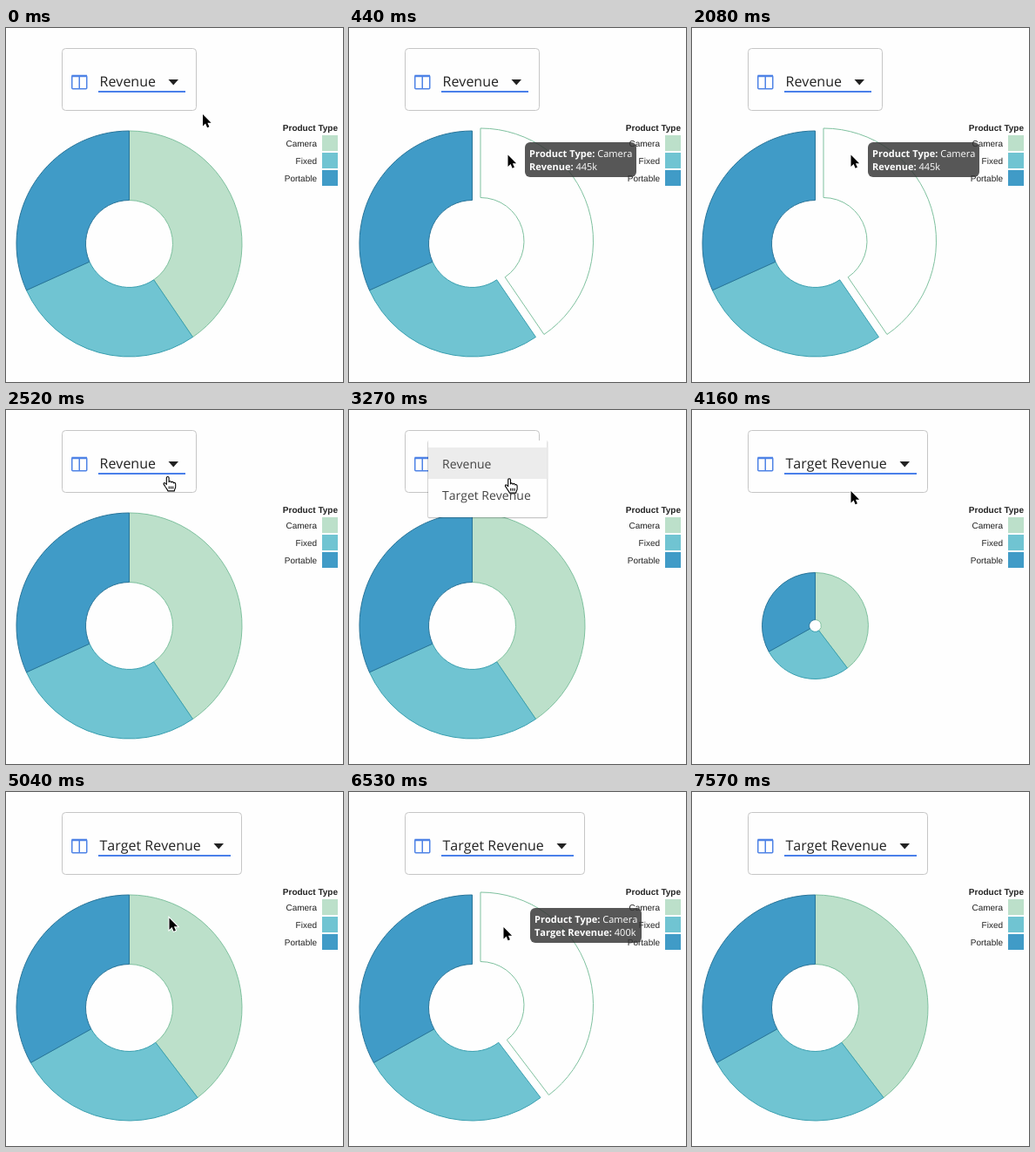
Write an HTML page that moves like this. It is 387 px wide and 406 px high and loops after 7670 ms.

```html
<!DOCTYPE html>
<html lang="en">
<head>
<meta charset="utf-8">
<title>Revenue donut</title>
<style>
html, body { margin: 0; width: 100%; height: 100%; overflow: hidden; background: #fefefe; }
svg { display: block; width: 100vw; height: 100vh; }
text { font-family: "Open Sans", sans-serif; font-kerning: none; text-rendering: geometricPrecision; white-space: pre; }
.legend text { font: 10px "Liberation Sans", Arial, sans-serif; text-anchor: end; fill: #222; }
.legend .title { font-weight: bold; font-kerning: normal; }
.label { font-size: 16px; }
.menu text { font-size: 14px; fill: #444; }
.tip text { font-size: 11px; fill: #fff; }
.tip .key { font-weight: bold; }
</style>
</head>
<body>
<svg viewBox="0 0 387 406">
  <g id="pie"></g>

  <g class="legend" id="legend">
    <text class="title" x="381" y="118">Product Type</text>
  </g>

  <rect id="box" x="64.5" y="23.5" height="71" rx="4" fill="#fefefe" stroke="#c6c6c6"/>
  <g fill="none" stroke="#4f83e6">
    <rect x="75.75" y="54.75" width="17" height="15" rx="1" stroke-width="1.5"/>
    <path d="M75.5 55H93" stroke-width="2.5"/>
    <path d="M84.25 55V70" stroke-width="1.5"/>
  </g>
  <g id="choice" fill="#222">
    <text class="label" id="label" x="107.5" y="67"></text>
    <path id="caret" d="M0 59H11.5L5.75 65.5Z"/>
  </g>
  <rect id="line" x="106"/>

  <g class="menu" id="menu">
    <rect x="90.5" y="36" width="137.5" height="88.5" rx="2" opacity=".1"/>
    <rect x="90" y="35" width="138.5" height="89" rx="2" opacity=".13"/>
    <rect x="91" y="35" width="136.5" height="88" rx="1" fill="#fefefe"/>
    <rect id="row" x="91" width="136.5" height="36" fill="#ececec"/>
    <text x="107" y="67">Revenue</text>
    <text x="107" y="103">Target Revenue</text>
  </g>

  <g class="tip" id="tip">
    <rect width="128" height="40" rx="6" fill="#323232" fill-opacity=".82"/>
    <text x="5" y="17"><tspan class="key">Product Type:</tspan> Camera</text>
    <text x="5" y="32"><tspan class="key" id="tipKey"></tspan><tspan id="tipVal"></tspan></text>
  </g>

  <path id="arrow" d="M0 0V13.4L3.1 10.6L5.1 15.2L7.4 14.2L5.4 9.8H9.6Z"
        fill="#000" stroke="#fff" stroke-width="2" paint-order="stroke"/>
  <path id="hand" fill="#fff" stroke="#000" stroke-width="1.1" stroke-linejoin="round"
        d="M-2 9V1.4C-2 -.4 .8 -.4 .8 1.4V6.2C1.2 4.8 3.4 5 3.5 6.6C4.2 5.4 6 5.8 6.1 7.3C7 6.5 8.4 7 8.4 8.6V11.5C8.4 13.5 7.2 14 7 16.5H-.4C-.6 14.6 -2.6 13.2 -3.6 11.2C-4.4 9.6 -6 8.6 -5.2 7.6C-4.2 6.6 -3 7.8 -2 9ZM1 11V14M3.2 11V14M5.4 11V14"/>
</svg>
<script>
const LOOP = 7670, STEP = 148.5;
const CX = 141.5, CY = 247.5, INNER = 50, OUTER = 129.5;
const $ = id => document.getElementById(id);
const set = (el, attrs) => { for (const k in attrs) el.setAttribute(k, attrs[k]); };
const show = (el, on) => set(el, { visibility: on ? "visible" : "hidden" });
const make = (tag, parent, attrs) => {
  const el = document.createElementNS("http://www.w3.org/2000/svg", tag);
  set(el, attrs);
  return parent.appendChild(el);
};

const kinds = [
  { name: "Camera", fill: "#bce0ca", edge: "#7fc19f" },
  { name: "Fixed", fill: "#70c4d2", edge: "#3ba0b0" },
  { name: "Portable", fill: "#409bc7", edge: "#2a7599" }
];
// cuts: ends of the first two slices in degrees, clockwise from the top
const measures = [
  { name: "Revenue", value: "445k", cuts: [145.7, 245.7], right: 218.5, tip: [202, 131] },
  { name: "Target Revenue", value: "400k", cuts: [142.7, 240.9], right: 270.5, tip: [208, 133] }
];

kinds.forEach((k, i) => {
  k.path = make("path", $("pie"), { fill: k.fill, stroke: k.edge });
  make("text", $("legend"), { x: 357, y: 135.5 + 20 * i }).textContent = k.name;
  make("rect", $("legend"), { x: 363, y: 123 + 20 * i, width: 18, height: 18, fill: k.fill });
});

const between = (t, a, b) => t >= a && t < b;
const ramp = (t, a, b) => Math.min(1, Math.max(0, (t - a) / (b - a)));
const ease = x => x < .5 ? 4 * x ** 3 : 1 - (2 - 2 * x) ** 3 / 2;
const smooth = x => x * x * (3 - 2 * x);

// the pointer glides to each place in turn
const glides = [
  { from: 0, to: 440, x: 182.5, y: 145.5 },
  { from: 2080, to: 2670, x: 187, y: 64 },
  { from: 2970, to: 3560, x: 182.5, y: 93 },
  { from: 4455, to: 5040, x: 187.5, y: 144.5 },
  { from: 6385, to: 6530, x: 177.5, y: 155 },
  { from: 6535, to: 7400, x: 349, y: 396 }
];
function pointer(t) {
  let x = 226, y = 99;
  for (const g of glides) {
    const p = smooth(ramp(t, g.from, g.to));
    x += (g.x - x) * p;
    y += (g.y - y) * p;
  }
  return `translate(${x} ${y})`;
}

function arc(a0, a1, r0, r1) {
  const pt = (a, r) => {
    const q = a * Math.PI / 180;
    return (CX + r * Math.sin(q)).toFixed(2) + " " + (CY - r * Math.cos(q)).toFixed(2);
  };
  return `M${pt(a0, r1)}A${r1} ${r1} 0 0 1 ${pt(a1, r1)}L${pt(a1, r0)}` +
    `A${r0} ${r0} 0 0 0 ${pt(a0, r0)}Z`;
}

function drawPie(t, cuts) {
  const grow = t < 3850 ? 1 : ease(ramp(t, 3865, 4765));
  const r0 = INNER * grow, r1 = INNER + (OUTER - INNER) * grow;
  const ends = [0, ...cuts, 360];
  kinds.forEach((k, i) => set(k.path, { d: arc(ends[i], ends[i + 1], r0, r1) }));

  const out = ramp(t, 100, 310) - ramp(t, 2080, 2240) + ramp(t, 5050, 5200) - ramp(t, 6540, 6700);
  set(kinds[0].path, { transform: `translate(${9.5 * out} ${-3 * out})`, "fill-opacity": 1 - out });
}

function drawSelect(t, { name, right }) {
  const focus = !between(t, 3700, 4000);
  set($("box"), { width: right - 64.5 });
  set($("caret"), { transform: `translate(${right - 32} 0)` });
  set($("choice"), { opacity: focus ? 1 : .85 });
  set($("line"), {
    width: right - 118.5, y: focus ? 72 : 73,
    height: focus ? 2 : 1, fill: focus ? "#4a80ea" : "#d4d4d4"
  });
  $("label").textContent = name;

  set($("menu"), { opacity: ramp(t, 2820, 3110) - ramp(t, 3565, 3890) });
  set($("row"), { y: t >= 3400 ? 79 : 43 });
}

function drawTip(t, { name, value, tip }) {
  show($("tip"), between(t, 285, 2220) || between(t, 5185, 6670));
  set($("tip"), { transform: `translate(${tip})` });
  $("tipKey").textContent = name + ":";
  $("tipVal").textContent = " " + value;
}

function draw(time) {
  const t = Math.floor((time + 10) / STEP) * STEP;
  const shown = measures[t >= 3850 ? 1 : 0];
  drawPie(t, shown.cuts);
  drawSelect(t, measures[t >= 3700 ? 1 : 0]);
  drawTip(t, shown);

  const at = pointer(t), hand = between(t, 2365, 3700);
  for (const id of ["hand", "arrow"]) set($(id), { transform: at });
  show($("hand"), hand);
  show($("arrow"), !hand && t < 7560);
}

const start = performance.now();
function tick() {
  draw((performance.now() - start) % LOOP);
  requestAnimationFrame(tick);
}
tick();
</script>
</body>
</html>
```
